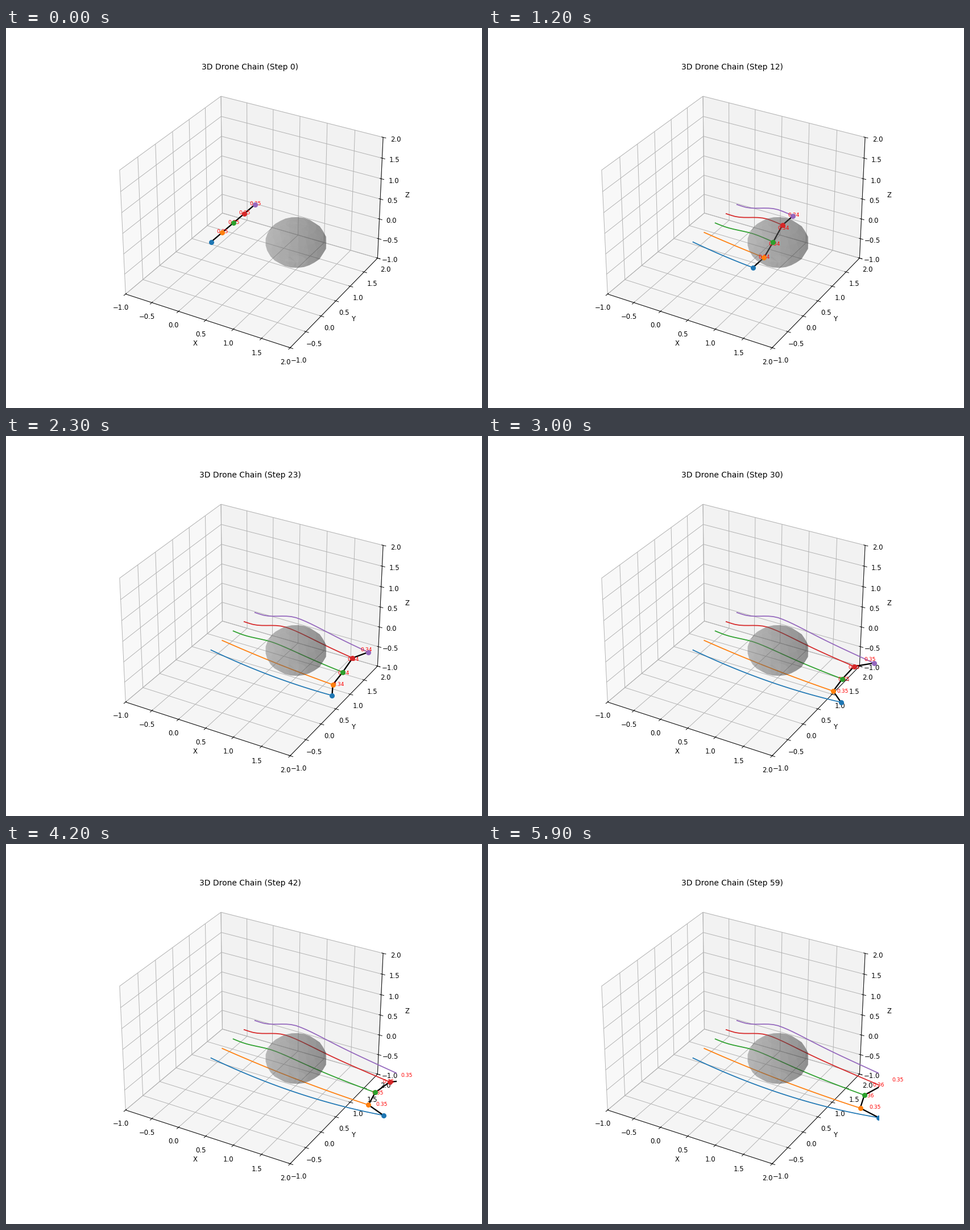
These frames come from a looping animation (837x669 px, 6000 ms). A matplotlib script:

```python
import numpy as np
import matplotlib.pyplot as plt
from matplotlib.animation import FuncAnimation
from matplotlib.lines import Line2D
from matplotlib.text import Text
from matplotlib.transforms import Affine2D

W, H, DPI = 837, 669, 250 / 3
STEPS, INTERVAL = 60, 100

# Per drone: goal x, approach rate, path slope, path bend, detour height
DRONES = [
    (697.5, 0.066, 0.478, -0.00048, 0),
    (663.0, 0.063, 0.443, -0.00022, 0),
    (666.5, 0.074, 0.410, -0.00011, 8.2),
    (698.5, 0.067, 0.330, 0.00015, 15.3),
    (735.0, 0.076, 0.330, 0.00021, 16),
]


def detour(d):
    """Quick rise in front of the obstacle, slow return behind it."""
    s = np.clip((d - 10) / 65, 0, 1)
    behind = np.maximum(d - 75, 0) / 75
    return s * s * (3 - 2 * s) / (1 + behind ** 2)


def drone_path(i, goal, rate, slope, bend, height):
    """Stage positions at every step: limited speed first, then easing in."""
    x0 = 360.5 + 19.85 * i - 0.137 * i ** 2
    y0 = 376.8 - 17 * i + 0.125 * i ** 2
    effort = 1.01 - 0.004 * height
    d = np.zeros(STEPS)
    for t in range(STEPS - 1):
        top_speed = effort * (8.05 + 0.115 * t)
        d[t + 1] = d[t] + min(top_speed, rate * (goal - x0 - d[t]))
    y = y0 + slope * d + bend * d ** 2 - height * detour(d)
    return np.column_stack([x0 + d, y])


def link_length(i, step):
    """Links tighten while passing the obstacle; inner ones end up stretched."""
    if 4 + 2 * i <= step < 24:
        return 0.344
    stretch = 0.006 if i in (1, 2) else 0
    return 0.35 + stretch * max(step - 42, 0) / (STEPS - 1 - 42)


paths = np.array([drone_path(i, *drone) for i, drone in enumerate(DRONES)])

fig = plt.figure(figsize=((W + 1e-6) / DPI, (H + 1e-6) / DPI), dpi=DPI)
ax = fig.add_subplot(111, projection="3d", computed_zorder=False)
ax.set(xlim=(-1, 2), ylim=(-1, 2), zlim=(-1, 2),
       xlabel="X", ylabel="Y", zlabel="Z")

# Obstacle
u, v = np.mgrid[0:2 * np.pi:20j, 0:np.pi:10j]
ax.plot_surface(1 + 0.5 * np.cos(u) * np.sin(v),
                1 + 0.5 * np.sin(u) * np.sin(v),
                -0.3 + 0.5 * np.cos(v),
                color="gray", alpha=0.3, zorder=2.5)

# Stage pixels, y pointing down
stage = Affine2D().scale(1 / W, -1 / H).translate(0, 1) + fig.transFigure


def add_line(**style):
    line = Line2D([], [], transform=stage, **style)
    ax.add_artist(line)
    line.set_clip_path(ax.patch)
    return line


def add_label():
    label = Text(0, 0, "", transform=stage, color="red", fontsize=8, zorder=3)
    ax.add_artist(label)
    label.set_clip_on(False)
    return label


trails = [add_line(color=f"C{i}", lw=1.5, zorder=2) for i in range(5)]
links = [add_line(color="black", lw=2, zorder=2.1) for _ in range(4)]
dots = [add_line(color=f"C{i}", ls="none", marker="o", ms=6.3, mew=1.5,
                 zorder=4) for i in range(5)]
labels = [add_label() for _ in links]


def update(step):
    ax.set_title(f"3D Drone Chain (Step {step})")
    for path, trail, dot in zip(paths, trails, dots):
        trail.set_data(*path[:step + 1].T)
        dot.set_data(*path[step:step + 1].T)
    for i, (link, label) in enumerate(zip(links, labels)):
        ends = paths[i:i + 2, step]
        link.set_data(*ends.T)
        x, y = ends.mean(axis=0)
        label.set_position((x, y - 7))
        label.set_text(f"{link_length(i, step):.2f}")
    return trails + links + dots + labels


anim = FuncAnimation(fig, update, frames=STEPS, interval=INTERVAL,
                     init_func=lambda: update(0), repeat=True, repeat_delay=0)
plt.show()
```
